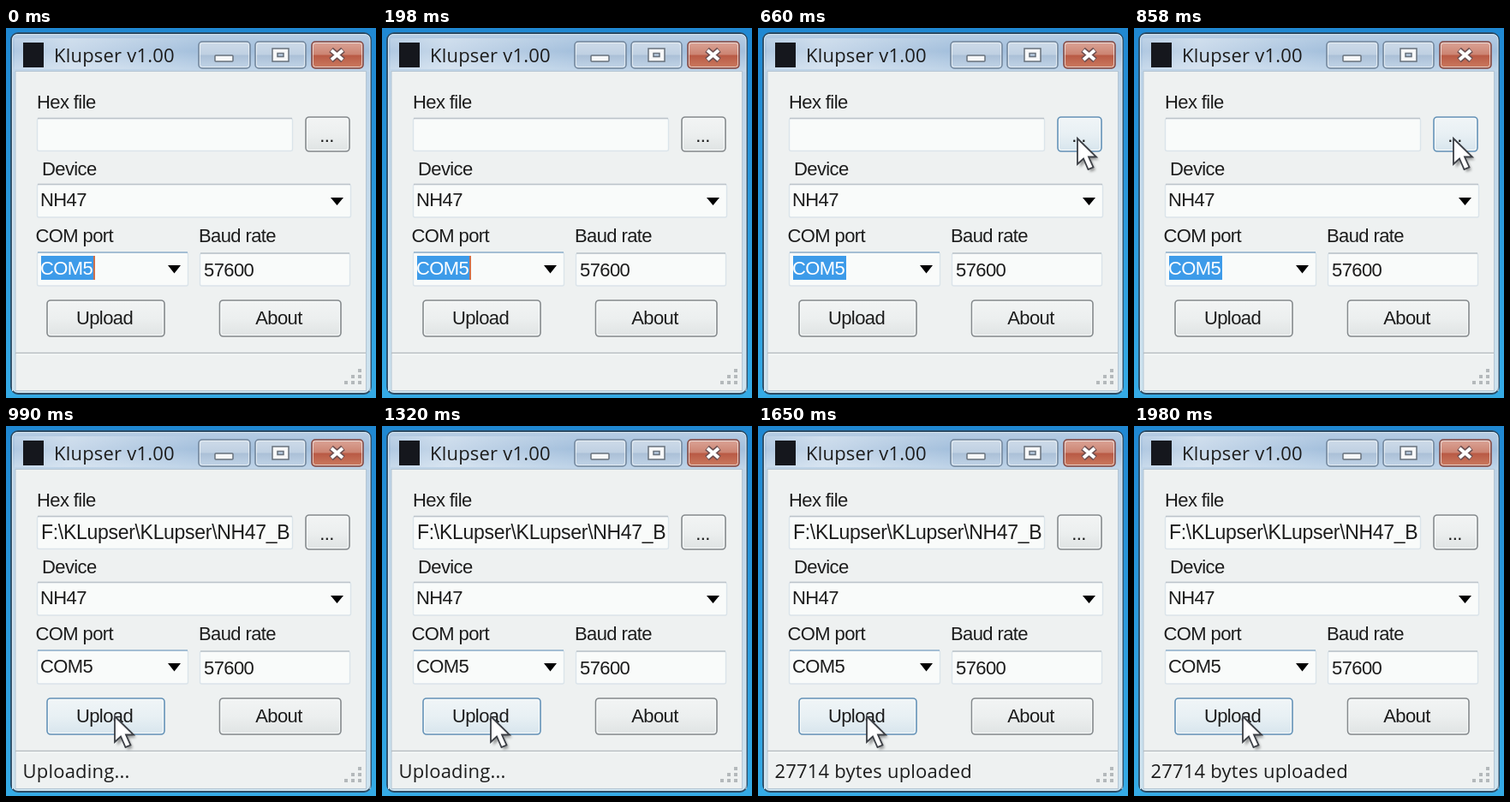
These frames come from a looping animation (432 px wide and 432 px high, 2310 ms). An HTML page:

```html
<!DOCTYPE html>
<html lang="en">
<head>
<meta charset="utf-8">
<title>Upload dialog</title>
<style>
  html, body { margin: 0; width: 100%; height: 100%; overflow: hidden; background: #2490d8; }
  svg { display: block; width: 100vw; height: 100vh; }
  text { font: 22px "Liberation Sans", Arial, sans-serif; letter-spacing: -.6px; fill: #1c1c1c; }
  .ui { font: 22px "Open Sans", sans-serif; letter-spacing: .2px; }
  .mid { text-anchor: middle; }
  .field { fill: #f9fbfa; stroke: #dbe4ea; stroke-width: 1.4; }
  .edge { stroke: #bcc3c9; stroke-width: 1.4; }
  .button { fill: url(#face); stroke: #858a8d; stroke-width: 1.6; }
  .button.hot { fill: url(#hotFace); stroke: #6593b8; }
  .shine { fill: none; stroke: #f8fbfb; }
  .caption { fill: url(#glass); stroke: #71859b; stroke-width: 1.5; }
  .glyph { fill: #f7f8f9; stroke: #68717c; stroke-width: 1.5; }
  .picked { fill: #fff; }
</style>
</head>
<body>
<svg viewBox="0 0 432 432">
  <defs>
    <linearGradient id="desk" x2="0" y2="1"><stop stop-color="#2088d2"/><stop offset="1" stop-color="#35abe6"/></linearGradient>
    <linearGradient id="frame" x2="0" y2="1"><stop stop-color="#b9d0e6"/><stop offset="1" stop-color="#cde3ef"/></linearGradient>
    <linearGradient id="bar" x2="0" y2="1">
      <stop stop-color="#b5cce3"/><stop offset=".45" stop-color="#a3bfdc"/><stop offset="1" stop-color="#c2d6e9"/>
    </linearGradient>
    <linearGradient id="glow">
      <stop stop-color="#fff" stop-opacity=".15"/><stop offset=".3" stop-color="#fff" stop-opacity=".4"/>
      <stop offset="1" stop-color="#fff" stop-opacity="0"/>
    </linearGradient>
    <linearGradient id="face" x2="0" y2="1">
      <stop stop-color="#f2f4f4"/><stop offset=".5" stop-color="#ecefef"/><stop offset="1" stop-color="#dfe3e3"/>
    </linearGradient>
    <linearGradient id="hotFace" x2="0" y2="1">
      <stop stop-color="#f0f5f7"/><stop offset=".5" stop-color="#e8f0f4"/><stop offset="1" stop-color="#d7e5ed"/>
    </linearGradient>
    <linearGradient id="glass" x2="0" y2="1">
      <stop stop-color="#cedbe9"/><stop offset=".48" stop-color="#bfd0e2"/>
      <stop offset=".52" stop-color="#abc0d7"/><stop offset="1" stop-color="#c1d4e7"/>
    </linearGradient>
    <linearGradient id="red" x2="0" y2="1">
      <stop stop-color="#dba598"/><stop offset=".48" stop-color="#cc8472"/>
      <stop offset=".52" stop-color="#b95a45"/><stop offset="1" stop-color="#cb7b60"/>
    </linearGradient>
    <filter id="soft" x="-50%" y="-50%" width="200%" height="200%"><feGaussianBlur stdDeviation="1.6"/></filter>
    <clipPath id="hexClip"><rect x="38" y="106" width="295" height="37"/></clipPath>
  </defs>

  <rect width="432" height="432" fill="url(#desk)"/>

  <!-- Window frame -->
  <rect x="6" y="6" width="420" height="421" rx="8" fill="url(#frame)" stroke="#2b4a63" stroke-width="1.800"/>
  <path d="M7.500 51V14q0-6.500 6.500-6.500h404q7 0 7 6.500v37z" fill="url(#bar)"/>
  <rect x="10" y="12" width="220" height="36" fill="url(#glow)"/>
  <path d="M7.500 424V14q0-6.500 6.500-6.500h404q7 0 7 6.500v410" fill="none" stroke="#dceaf4"/>
  <rect x="11" y="50.500" width="409.500" height="373" fill="#eef1f1" stroke="#b4c5d3"/>
  <rect x="20" y="17" width="24" height="29" fill="#15171d"/>
  <text class="ui" x="56" y="39.500">Klupser v1.00</text>

  <g class="caption">
    <rect x="225" y="16" width="60" height="31" rx="4"/>
    <rect x="291" y="16" width="59" height="31" rx="4"/>
    <rect x="357" y="16" width="60" height="31" rx="4" style="fill:url(#red);stroke:#804a46"/>
  </g>
  <g class="shine" stroke-opacity=".65">
    <rect x="226.500" y="17.500" width="57" height="28" rx="3"/>
    <rect x="292.500" y="17.500" width="56" height="28" rx="3"/>
    <rect x="358.500" y="17.500" width="57" height="28" rx="3"/>
  </g>
  <rect class="glyph" x="244" y="32" width="21" height="7" rx="1"/>
  <path class="glyph" fill-rule="evenodd" d="M311 24h19v15h-19zM317 29.500h7v4h-7z"/>
  <path d="M379.500 25.500l14 12m0-12l-14 12" stroke="#6d4f50" stroke-width="7"/>
  <path d="M380 26l13 11m0-11l-13 11" stroke="#fff" stroke-width="4"/>

  <!-- Form -->
  <text x="36" y="94">Hex file</text>
  <text x="42" y="172">Device</text>
  <text x="34.500" y="250">COM port</text>
  <text x="225" y="250">Baud rate</text>
  <g class="field">
    <rect x="36.500" y="105.500" width="298" height="38" rx="2"/>
    <rect x="36.500" y="182.500" width="366" height="38.500" rx="2"/>
    <rect x="36.500" y="262" width="176" height="39" rx="2"/>
    <rect x="226.500" y="263" width="175" height="38" rx="2"/>
  </g>
  <path class="edge" d="M37 105.500h297M37 182.500h365M227 263h174"/>
  <path d="M37 262h175" stroke="#8fb1cb" stroke-width="1.400"/>
  <g clip-path="url(#hexClip)"><text id="path" x="41" y="132" style="font-size:23px;letter-spacing:-.3px">F:\KLupser\KLupser\NH47_B</text></g>
  <text x="40" y="208">NH47</text>
  <rect id="mark" x="41" y="266" width="62" height="28" fill="#3d9be9"/>
  <path id="caret" d="M103 266v28" stroke="#d0704a" stroke-width="2"/>
  <text id="port" x="40" y="288">COM5</text>
  <text x="231" y="290">57600</text>
  <path d="M379 198h15l-7.500 9zM189 277h15l-7.500 9.500z"/>

  <g class="button">
    <rect id="browse" class="button" x="350" y="104" width="51" height="40" rx="4"/>
    <rect id="upload" class="button" x="48" y="318" width="137" height="42" rx="4"/>
    <rect x="249.500" y="318" width="141.500" height="42" rx="4"/>
  </g>
  <g class="shine">
    <rect x="351.500" y="105.500" width="48" height="37" rx="3"/>
    <rect x="49.500" y="319.500" width="134" height="39" rx="3"/>
    <rect x="251" y="319.500" width="138.500" height="39" rx="3"/>
  </g>
  <text class="mid" x="374.500" y="133">...</text>
  <text class="mid" x="115" y="346">Upload</text>
  <text class="mid" x="318.500" y="346">About</text>

  <!-- Status bar -->
  <path d="M11 379.500h409" stroke="#b5bcc0" stroke-width="1.500"/>
  <path d="M12 381h408" stroke="#fafcfc"/>
  <path d="M411 400h4M403 407h4m4 0h4M395 414h4m4 0h4m4 0h4" stroke="#b4b9bb" stroke-width="4"/>
  <text id="status" class="ui" x="19.500" y="411"></text>

  <g id="pointer">
    <path d="M3 4v30l7-7 5 12 6-2-5-12h9z" fill="#000" opacity=".35" filter="url(#soft)"/>
    <path d="M0 0v30l7-6.500 5.500 12.500 6-2.500-5.500-12h9z" fill="#fff" stroke="#3c3f45" stroke-width="1.800"/>
  </g>
</svg>
<script>
  const STEP = 330, STEPS = 7;
  const el = id => document.getElementById(id);
  const show = (id, on) => el(id).style.display = on ? "" : "none";

  function draw(now) {
    const step = Math.floor(now / STEP) % STEPS;
    const loaded = step >= 3;
    show("path", loaded);
    show("mark", !loaded);
    show("caret", step === 0);
    show("pointer", step > 0);
    el("port").classList.toggle("picked", !loaded);
    el("browse").classList.toggle("hot", step > 0 && !loaded);
    el("upload").classList.toggle("hot", loaded);
    el("pointer").setAttribute("transform", loaded ? "translate(127 339)" : "translate(373 129)");
    el("status").textContent = !loaded ? "" : step < 5 ? "Uploading..." : "27714 bytes uploaded";
  }

  const start = performance.now();
  function tick() {
    draw(performance.now() - start);
    requestAnimationFrame(tick);
  }
  tick();
</script>
</body>
</html>
```
